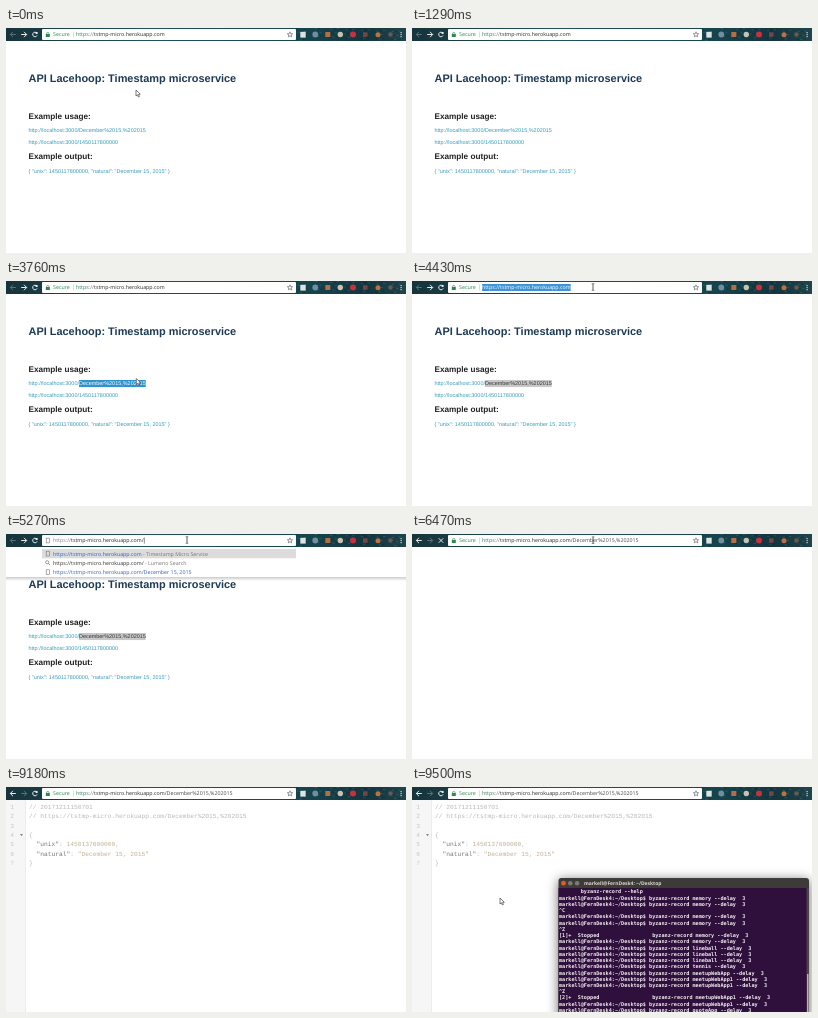
Recreate the animation shown at these times as an HTML page with a canvas. Size 400 by 225 pixels, loop 9.62 s.

```html
<!DOCTYPE html>
<html lang="en">
<head>
<meta charset="utf-8">
<title>Timestamp microservice</title>
<style>
html, body { margin: 0; width: 100%; height: 100%; overflow: hidden; background: #fff; }
canvas { display: block; width: 100vw; height: 100vh; }
</style>
</head>
<body>
<canvas id="stage"></canvas>
<script>
const LOOP = 9620, W = 400, H = 225;
const canvas = document.getElementById('stage');
const ctx = canvas.getContext('2d');

const UI = '5.3px "Open Sans", sans-serif';
const LINK = '5.48px "Liberation Sans", sans-serif';
const CODE = '6.26px "Liberation Mono", monospace';
const TERM = 'bold 5.17px "DejaVu Sans Mono", monospace';
const HOST = 'tstmp-micro.herokuapp.com';
const DATE = 'December%2015,%202015';

const T = {
  focus: 4380, deselect: 4840, typed: 5270, pasted: 5540,
  enter: 5860, commit: 6470, formatted: 6580, fold: 7110, terminal: 9330
};

// Pointer keys: time, x, y, shape used until the next key
const pointerPath = [
  [0, 130, 62, 'arrow'], [50, 130, 62, 'arrow'], [300, 92, 100, 'arrow'],
  [430, 70, 121, 'arrow'], [640, 124, 88, 'arrow'], [880, 164, 13, 'arrow'],
  [1030, 164, 12, 'beam'], [1240, 50, 10, 'none'],
  [1540, 27, 0, 'arrow'], [1760, 62, 47, 'arrow'], [2090, 149, 107, 'arrow'],
  [2240, 149, 107, 'beam'], [2500, 145, 105, 'beam'], [2660, 141, 104, 'beam'],
  [3110, 74, 103, 'beam'], [3460, 74, 101, 'arrow'], [3610, 129, 98, 'arrow'],
  [3760, 130, 98, 'arrow'], [3920, 178, 13, 'arrow'], [4080, 178, 12, 'arrow'],
  [4130, 180, 8, 'beam'], [4230, 181, 6, 'beam'], [6470, 181, 6, 'beam'],
  [6800, 207, 61.5, 'beam'], [8210, 207, 61.5, 'beam'], [8260, 176, 82, 'arrow'],
  [8370, 104, 116, 'arrow'], [8490, 31, 79, 'arrow'], [8830, 31, 79, 'arrow'],
  [9150, -3, 64, 'none'], [9330, 23, 84, 'arrow'], [9500, 88, 111, 'arrow']
];

const lerp = (a, b, p) => a + (b - a) * p;
const progress = (t, a, b) => Math.max(0, Math.min(1, (t - a) / (b - a)));

function rect(x, y, w, h, color) {
  ctx.fillStyle = color;
  ctx.fillRect(x, y, w, h);
}

function disc(x, y, r, color) {
  ctx.fillStyle = color;
  ctx.beginPath();
  ctx.arc(x, y, r, 0, Math.PI * 2);
  ctx.fill();
}

function line(points, color, width = 0.8) {
  ctx.strokeStyle = color;
  ctx.lineWidth = width;
  ctx.beginPath();
  points.forEach(([x, y]) => ctx.lineTo(x, y));
  ctx.stroke();
}

function text(str, x, y, font, color) {
  ctx.font = font;
  ctx.fillStyle = color;
  ctx.fillText(str, x, y);
  return x + ctx.measureText(str).width;
}

// Draws [string, color] runs one after another and returns the end x
const runs = (parts, x, y, font) =>
  parts.reduce((at, [str, color]) => text(str, at, y, font, color), x);

function arrowIcon(x, dir, color) {
  line([[x - 2.8 * dir, 6.5], [x + 2.6 * dir, 6.5]], color, 1);
  line([[x, 3.8], [x + 2.7 * dir, 6.5], [x, 9.2]], color, 1);
}

function reloadIcon(loading) {
  if (loading) {
    line([[26.8, 4.3], [31.2, 8.7]], '#e8eeee', 1);
    line([[31.2, 4.3], [26.8, 8.7]], '#e8eeee', 1);
    return;
  }
  ctx.strokeStyle = '#e8eeee';
  ctx.lineWidth = 1;
  ctx.beginPath();
  ctx.arc(29, 6.5, 2.3, 0.4, 5.3);
  ctx.stroke();
  rect(29.6, 4, 2, 2, '#e8eeee');
}

function pageIcon(y) {
  ctx.strokeStyle = '#777';
  ctx.lineWidth = 0.6;
  ctx.strokeRect(40.2, y - 2.4, 3.4, 4.8);
}

function lockIcon() {
  rect(39.8, 6, 4, 3, '#2b8a4b');
  ctx.strokeStyle = '#2b8a4b';
  ctx.lineWidth = 0.7;
  ctx.beginPath();
  ctx.arc(41.8, 5.8, 1.3, Math.PI, 0);
  ctx.stroke();
}

function star(x, y) {
  const points = Array.from({ length: 11 }, (_, i) => {
    const r = i % 2 ? 1.2 : 2.8, a = -Math.PI / 2 + i * Math.PI / 5;
    return [x + r * Math.cos(a), y + r * Math.sin(a)];
  });
  line(points, '#555', 0.6);
}

function addressBar(t) {
  ctx.fillStyle = '#fff';
  ctx.beginPath();
  ctx.roundRect(36, 1, 254, 11, 1);
  ctx.fill();
  star(284, 6.6);

  const editing = t >= T.typed && t < T.commit;
  let x = 47;
  if (editing) {
    pageIcon(6.5);
  } else {
    lockIcon();
    text('Secure', 47, 8.4, UI, '#2b8a4b');
    rect(67, 3.5, 0.5, 6, '#bbb');
    x = 70;
  }

  const selected = t >= T.focus && t < T.deselect;
  if (selected) {
    ctx.font = UI;
    rect(x, 3, ctx.measureText('https://' + HOST).width, 7, '#3d94d6');
  }
  const path = t >= T.pasted ? '/' + DATE : t >= T.typed ? '/' : '';
  const end = runs([
    ['https', selected ? '#fff' : editing ? '#888' : '#37805a'],
    ['://', selected ? '#fff' : '#777'],
    [HOST, selected ? '#fff' : '#2b2b2b'],
    [path, t >= T.commit ? '#4a4a4a' : '#2b2b2b']
  ], x, 8.4, UI);
  if (t >= T.deselect && t < T.enter) rect(end + 0.3, 3.4, 0.5, 6.2, '#222');
}

function toolbar(t) {
  const shade = ctx.createLinearGradient(0, 0, W, 0);
  shade.addColorStop(0, '#17333b');
  shade.addColorStop(0.35, '#1f525b');
  shade.addColorStop(0.76, '#16444d');
  shade.addColorStop(0.9, '#14363f');
  shade.addColorStop(1, '#1f444a');
  rect(0, 0, W, 13, shade);
  for (let i = 0; i < 60; i++) {
    const x = 290 + (i * 47.3) % 110, y = (i * 5.7) % 12;
    rect(x, y, 2.5, 0.7, i % 2 ? 'rgba(90,150,154,.35)' : 'rgba(5,18,23,.35)');
  }
  const visited = t >= T.commit;
  arrowIcon(7, -1, visited ? '#e8eeee' : '#58737a');
  arrowIcon(18, 1, visited ? '#58737a' : '#e8eeee');
  reloadIcon(t >= T.enter && t < 6800);
  addressBar(t);

  rect(294.3, 3.8, 5.4, 5.8, '#dfe4e3');
  disc(309.3, 6.5, 2.9, '#6f8fa0');
  rect(319.3, 4, 5, 5, '#b66d43');
  disc(334.3, 6.5, 2.7, '#c9c2b4');
  disc(347, 6.5, 3, '#c8303d');
  rect(357, 4.3, 4.5, 4.5, '#71464a');
  disc(372, 6.8, 2.5, '#bd7040');
  disc(384.5, 6.5, 2.3, '#665a50');
  for (let i = 0; i < 3; i++) rect(394.5, 4 + i * 2, 1.2, 1.2, '#d3d8d5');
}

function homePage(t) {
  const bold = size => `bold ${size}px "Liberation Sans", sans-serif`;
  text('API Lacehoop: Timestamp microservice', 22.5, 53.6, bold(10.95), '#1d3a57');
  text('Example usage:', 22.5, 90.6, bold(8.2), '#222');
  text('Example output:', 22.5, 131.3, bold(8.2), '#222');

  const blue = '#359bbd';
  const start = text('http://localhost:3000/', 22.5, 104, LINK, blue);
  const end = text(DATE, start, 104, LINK, blue);
  text('http://localhost:3000/1450117800000', 22.5, 116, LINK, blue);
  text('{ "unix": 1450117800000, "natural": "December 15, 2015" }', 22.5, 145, LINK, blue);

  const drag = progress(t, 2660, 3110);
  if (drag > 0) {
    const muted = t >= T.focus && t < T.enter;
    const from = lerp(end, start, drag);
    ctx.save();
    ctx.beginPath();
    ctx.rect(from, 98.9, end - from, 7.3);
    ctx.clip();
    rect(from, 98.9, end - from, 7.3, muted ? '#c8c8c8' : '#2f93cc');
    text(DATE, start, 104, LINK, muted ? '#333' : '#fff');
    ctx.restore();
  }
}

function suggestions(t) {
  const fade = ctx.createLinearGradient(0, 43, 0, 47);
  fade.addColorStop(0, 'rgba(0,0,0,.2)');
  fade.addColorStop(1, 'rgba(0,0,0,0)');
  rect(0, 13, W, 30, '#fff');
  rect(0, 43, W, 4, fade);
  rect(36, 15, 254, 9.3, '#dcdcdc');

  const blue = '#3464b4', gray = '#777', dark = '#333';
  const base = 'https://' + HOST;
  const pasted = t >= T.pasted;
  const rows = [
    pasted ? [[base + '/' + DATE, blue]] : [[base, blue], [' - Timestamp Micro Service', gray]],
    [[base + '/' + (pasted ? DATE : ''), dark], [' - Lumeno Search', gray]],
    [[base + '/December 15, 2015', blue]]
  ];
  rows.forEach((row, i) => {
    const y = 19.6 + i * 9.3;
    runs(row, 47, y + 1.9, UI);
    if (i !== 1) return pageIcon(y);
    ctx.strokeStyle = '#777';
    ctx.lineWidth = 0.7;
    ctx.beginPath();
    ctx.arc(41.2, y - 0.6, 1.6, 0, Math.PI * 2);
    ctx.stroke();
    line([[42.4, y + 0.6], [44, y + 2.2]], '#777');
  });
}

function jsonPage(t) {
  if (t < T.formatted) return;
  const gray = '#b8b8b8', key = '#777', value = '#c3b096';
  const rows = [
    [['// 20171211150701', gray]],
    [[`// https://${HOST}/${DATE}`, gray]],
    [],
    [['{', gray]],
    [['  "unix"', key], [': ', gray], ['1450137600000', value], [',', gray]],
    [['  "natural"', key], [': ', gray], ['"December 15, 2015"', value]],
    [['}', gray]]
  ];
  rect(0, 13, 19.5, H - 13, '#f6f6f6');
  rect(19.5, 13, 0.5, H - 13, '#dedede');
  rows.forEach((row, i) => {
    const y = 21.9 + i * 9.33;
    text(String(i + 1), 4.3, y, CODE, '#c6c6c6');
    runs(row, 23, y, CODE);
  });
  ctx.fillStyle = t >= T.fold ? '#888' : '#ccc';
  ctx.beginPath();
  ctx.moveTo(14, 47);
  ctx.lineTo(17, 47);
  ctx.lineTo(15.5, 49.3);
  ctx.fill();
}

function terminal(t) {
  const shown = progress(t, T.terminal, 9500);
  if (!shown) return;
  const left = 146.5, right = 397, top = 91;
  const who = 'markell@FernDesk4';
  const record = name => `byzanz-record ${name} --delay  3`;
  const typed = name => `${who}:~/Desktop$ ${record(name)}`;
  const stopped = (n, name) => `[${n}]+  Stopped`.padEnd(30) + record(name);
  const lines = [
    '       byzanz-record --help', typed('memory'), typed('memory'), '^C',
    typed('memory'), typed('memory'), '^Z', stopped(1, 'memory'), typed('memory'),
    typed('lineball'), typed('lineball'), typed('lineball'), typed('tennis'),
    typed('meetupWebApp'), typed('meetupWebApp1'), typed('meetupWebApp1'), '^Z',
    stopped(2, 'meetupWebApp1'), typed('meetupWebApp1'), typed('quoteApp')
  ];

  ctx.save();
  ctx.globalAlpha = shown;
  ctx.save();
  ctx.shadowColor = 'rgba(0,0,0,.6)';
  ctx.shadowBlur = 12 * canvas.width / W;
  ctx.shadowOffsetY = 2 * canvas.height / H;
  ctx.fillStyle = '#3d3b37';
  ctx.beginPath();
  ctx.roundRect(left, top, right - left, H, [3, 3, 0, 0]);
  ctx.fill();
  ctx.restore();

  rect(left, 101, right - left, H - 101, '#2f0f3c');
  rect(right - 2.5, 101, 2.5, H - 101, '#4a4347');
  rect(right - 2, 187, 1.5, H - 187, '#b9b3b0');
  disc(151.5, 96.2, 2.4, '#e2582f');
  disc(158.3, 96.2, 2.3, '#7d7a72');
  disc(165.1, 96.2, 2.3, '#7d7a72');
  text(who + ': ~/Desktop', 172, 98.2, 'bold 4.95px "Open Sans", sans-serif', '#dfdbd2');
  lines.forEach((str, i) => text(str, 147, 106.4 + i * 6.24, TERM, '#f3eef2'));
  ctx.restore();
}

function pointer(t) {
  let i = pointerPath.length - 1;
  while (pointerPath[i][0] > t) i--;
  const [t0, x0, y0, shape] = pointerPath[i];
  const [t1, x1, y1] = pointerPath[i + 1] || [LOOP, x0, y0];
  const p = progress(t, t0, t1);
  if (shape === 'none') return;

  ctx.save();
  ctx.translate(lerp(x0, x1, p), lerp(y0, y1, p));
  if (shape === 'beam') {
    line([[0, -3], [0, 3]], '#333', 0.8);
    line([[-1.3, -3.3], [1.3, -3.3]], '#333', 0.6);
    line([[-1.3, 3.3], [1.3, 3.3]], '#333', 0.6);
  } else {
    ctx.beginPath();
    [[0, 0], [0, 6], [1.4, 4.8], [2.4, 7], [3.4, 6.5], [2.5, 4.4], [4.3, 4.3]]
      .forEach(([x, y]) => ctx.lineTo(x, y));
    ctx.closePath();
    ctx.fillStyle = '#fff';
    ctx.strokeStyle = '#444';
    ctx.lineWidth = 0.7;
    ctx.fill();
    ctx.stroke();
  }
  ctx.restore();
}

function draw(t) {
  const scale = devicePixelRatio || 1;
  const w = Math.round(innerWidth * scale), h = Math.round(innerHeight * scale);
  if (canvas.width !== w || canvas.height !== h) {
    canvas.width = w;
    canvas.height = h;
  }
  ctx.setTransform(w / W, 0, 0, h / H, 0, 0);
  ctx.textRendering = 'geometricPrecision';
  rect(0, 0, W, H, '#fff');
  if (t < T.commit) homePage(t);
  else jsonPage(t);
  if (t >= T.typed && t < T.enter) suggestions(t);
  toolbar(t);
  terminal(t);
  pointer(t);
}

const begin = performance.now();
function tick() {
  draw((performance.now() - begin) % LOOP);
  requestAnimationFrame(tick);
}
tick();
</script>
</body>
</html>
```
